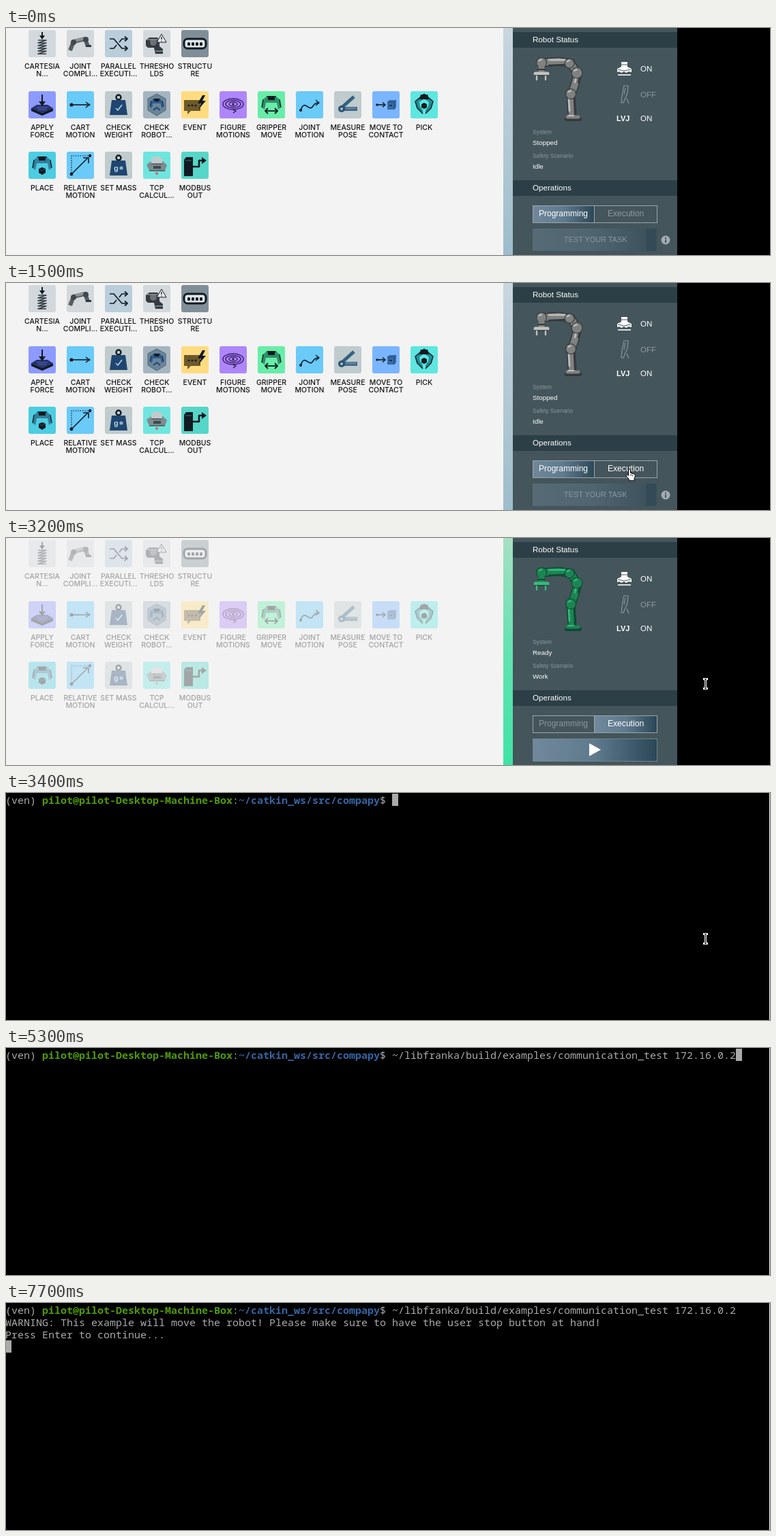
Write an HTML page that moves like this. It is 1120 by 334 pixels and loops after 8 s.

```html
<!DOCTYPE html>
<html lang="en">
<head>
<meta charset="utf-8">
<title>Robot console</title>
<style>
html, body { margin: 0; width: 100%; height: 100%; overflow: hidden; background: #000; }
svg { display: block; width: 1120px; height: 334px; }
text { white-space: pre; }
.label { font: 500 10.5px Inter, sans-serif; text-anchor: middle; fill: #141414; }
.ui { font-family: "Liberation Sans", Arial, sans-serif; }
.term { font: 15px "Noto Sans Mono", monospace; fill: #aaa; }
.term .b { font-weight: 700; }
#desk { --dark: #34393b; --body: #7f8280; --lite: #c0c2be; }
#desk.run { --dark: #0d4a33; --body: #1c8455; --lite: #3db97d; }
#desk.run #tiles { opacity: .36; }
#desk .on, #desk.run .off { display: none; }
#desk.run .on { display: inline; }
.dark { stroke: var(--dark); fill: none; }
.body { stroke: var(--body); fill: none; }
.lite { stroke: var(--lite); fill: none; }
</style>
</head>
<body>
<svg id="stage" viewBox="0 0 1120 334" xmlns="http://www.w3.org/2000/svg"></svg>
<script>
const INK = '#111a22', NAVY = '#1f4670', STEEL = '#34617f';
const rect = (x, y, w, h, fill, more = '') =>
  `<rect x="${x}" y="${y}" width="${w}" height="${h}" fill="${fill}" ${more}/>`;
const fill = (d, c = INK) => `<path d="${d}" fill="${c}"/>`;
const line = (d, c = INK, w = 1.6) =>
  `<path d="${d}" fill="none" stroke="${c}" stroke-width="${w}" stroke-linejoin="round"/>`;
const dot = (x, y, r, c = INK) => `<circle cx="${x}" cy="${y}" r="${r}" fill="${c}"/>`;
const text = (x, y, size, str, color = '#fff', more = '') =>
  `<text class="ui" x="${x}" y="${y}" font-size="${size}" fill="${color}" ${more}>${str}</text>`;
const grad = (id, stops, vertical) =>
  `<linearGradient id="${id}" x2="${vertical ? 0 : 1}" y2="${vertical ? 1 : 0}">` +
  stops.map((c, i) => `<stop offset="${i / (stops.length - 1)}" stop-color="${c}"/>`).join('') +
  '</linearGradient>';

// Icon parts on a 40 x 40 tile
const weight = mark =>
  `<circle cx="20" cy="9" r="3.5" fill="none" stroke="${INK}" stroke-width="2.4"/>` +
  fill('M10 13H30L33 35H7Z', NAVY) + mark;
const claw = (c = STEEL) =>
  fill('M8 12L13 8H27L32 12L34 24L30 27L28 17H12L10 27L6 24Z', c) +
  line('M13 8H27M8 12L6 24M32 12L34 24', INK, 1.4) + fill('M15 7H25V13H15Z');
const diamond =
  fill('M20 4L33 15L30 25L22 33V28L26 22L27 16L20 11L13 16L14 22L18 28V33L10 25L7 15Z', '#1f8f97') +
  line('M20 4L33 15L30 25L22 33M20 4L7 15L10 25L18 33', INK, 1.5) + fill('M15 5H25L27 12H13Z');
const cube = c => fill('M20 17L24 19V24L20 26L16 24V19Z', c);

const art = {
  coil: line('M14 15H26L14 19H26L14 23H26L14 27H26L14 31H26L14 35H26', '#333c42', 1.5) +
    line('M20 3V11', INK, 2) + fill('M16 8H24L20 14Z'),
  arm: line('M5 30L10 17L27 13L31 24', '#565d61', 6) + line('M11 16L27 12', '#8c9498', 4) +
    dot(10, 18, 4, '#41484c') + dot(28, 14, 4, '#41484c') + fill('M28 22H36V25H28Z', '#33393c'),
  shuffle: line('M7 13H13L25 27H32M7 27H13L17 22M21 18L25 13H32', INK, 1.7) +
    line('M29 9.5L33 13L29 16.5M29 23.5L33 27L29 30.5', INK, 1.7),
  limit: fill('M4 15L9 11H21L24 15V24L29 28V35H18L16 26H7L4 23Z', '#343b40') +
    dot(15, 18, 5, '#697277') + line('M18 31H29M6 14H22', '#8a9398', 1.3) +
    `<path d="M27 6L34 18H20Z" fill="#eee" stroke="${INK}"/>` + line('M27 10V14M27 15.5V16.8', INK, 1.3),
  chain: rect(4, 13, 32, 14, '#dfe5e8', `rx="5" stroke="${INK}" stroke-width="3"`) +
    [9, 15, 21, 27].map(x => rect(x, 18, 4, 5, INK, 'rx="1.5"')).join(''),
  press: fill('M4 25L12 20H28L36 25L20 32Z', '#26336e') + fill('M4 25L20 32L36 25V29L20 36L4 29Z', INK) +
    line('M12 24H28M14 27H26', '#5b6ac0', 1) + line('M20 5V17', INK, 2) + fill('M15 15H25L20 22Z'),
  straight: dot(7, 20, 2.6) + line('M7 20H31') + line('M28 16L33 20L28 24') + dot(33, 20, 1.4),
  check: weight(line('M16 25L19 28L25 20', '#b8d3e6', 1.6)),
  robot: fill('M20 4L33 11V28L20 36L7 28V11Z', '#6b8498') + line('M20 4L33 11V28L20 36L7 28V11Z', '#4b6376', 1) +
    `<g transform="translate(6 6) scale(.7)">${claw('#2d5e92')}</g>` + line('M15 28L20 24L25 28', NAVY, 2),
  event: fill('M4 13H28V29H14L9 34V29H4Z', '#6e5a2b') + [11, 16, 21].map(x => dot(x, 21, 1.5)).join('') +
    fill('M31 6L24 18H29L25 27L36 14H31L35 6Z'),
  spiral: [[15, 8], [11, 5.5], [6, 3]].map(([a, b]) =>
    `<ellipse cx="20" cy="19" rx="${a}" ry="${b}" fill="none" stroke="#3c1f6e" stroke-width="1.5"/>`).join('') +
    dot(20, 19, 1.6) + line('M20 27L24 29L20 32', INK, 1.3),
  grip: claw('#2f8f68') + line('M12 29H28', INK, 1.8) + line('M15 25L11 29L15 33M25 25L29 29L25 33', INK, 1.8),
  curve: dot(7, 28, 2) + line('M7 28C13 10 19 32 25 22Q28 17 33 17') + line('M29 13L34 17L29 21'),
  measure: line('M8 27L29 8', STEEL, 5) + rect(7, 23, 27, 6, '#436b8b') +
    dot(11, 26, 5, '#2a5374') + dot(11, 26, 2, '#a9bac3') + line('M17 25H32', '#87a3b4', 1),
  contact: dot(7, 20, 1.8) + line('M7 20H18') + line('M15 16.5L19 20L15 23.5') +
    fill('M22 16L25 13H35V24L32 27H22Z', '#396ba5') + line('M22 16H32V27M32 16L35 13', '#1e477a', 1) +
    line('M25 21H29', INK, 1.4),
  pick: diamond + cube(INK),
  place: claw('#347d9a') + fill('M20 23L25 25V31L20 34L15 31V25Z') + line('M15 25L20 28L25 25', '#49646c', .8),
  relative: line('M7 33L31 9') + line('M24 9H32V17', INK, 1.6) + dot(7, 33, 2.4) + dot(34, 6, 2.2) +
    '<path d="M7 31V6H32" fill="none" stroke="#111a22" stroke-width="1.2" stroke-dasharray="1.6 1.8"/>',
  mass: weight(text(13, 28, 11, 'g', '#b8d3e6', 'font-weight="700"') + dot(24, 24, 2.6, '#8fb0c8')),
  tcp: fill('M5 19L12 14H29L35 20L32 28H9Z', '#7d8c90') + fill('M12 10Q20 4 28 10V18H12Z', '#c4cbcc') +
    line('M9 28H32M12 18H28', '#475459', 1.5) + fill('M15 21H26V25H15Z', '#3d494e') + dot(20, 32, 2, '#c96a6a'),
  output: fill('M4 12L7 8H17V36H4Z') + line('M17 22H26V13H32', INK, 2.6) + fill('M30 8L37 13L30 18Z') +
    line('M6 13H15', '#35756f', 1),
};

const rows = [
  [3, [['#d2d8dc', 'coil', 'CARTESIA|N...'], ['#d2d8dc', 'arm', 'JOINT|COMPLI...'],
    ['#b9cddb', 'shuffle', 'PARALLEL|EXECUTI...'], ['#d2d8dc', 'limit', 'THRESHO|LDS'],
    ['#808e98', 'chain', 'STRUCTU|RE']]],
  [93, [['#8d9aff', 'press', 'APPLY|FORCE'], ['#6acaf8', 'straight', 'CART|MOTION'],
    ['#bfcbcd', 'check', 'CHECK|WEIGHT'], ['#a5b5c0', 'robot', 'CHECK|ROBOT...'],
    ['#ffdc80', 'event', 'EVENT'], ['#ae86fa', 'spiral', 'FIGURE|MOTIONS'],
    ['#68eda8', 'grip', 'GRIPPER|MOVE'], ['#6acaf8', 'curve', 'JOINT|MOTION'],
    ['#bfcbcd', 'measure', 'MEASURE|POSE'], ['#7ab6ff', 'contact', 'MOVE TO|CONTACT'],
    ['#5ee6e1', 'pick', 'PICK']]],
  [182, [['#4ccde2', 'place', 'PLACE'], ['#6acaf8', 'relative', 'RELATIVE|MOTION'],
    ['#bfcbcd', 'mass', 'SET MASS'], ['#6fe5df', 'tcp', 'TCP|CALCUL...'],
    ['#56d6c8', 'output', 'MODBUS|OUT']]],
];
const tile = (x, y, [color, icon, label]) =>
  `<g transform="translate(${x} ${y})">${rect(0, 0, 40, 40, color, 'rx="3"')}${art[icon]}` +
  label.split('|').map((s, i) => `<text class="label" x="20" y="${57 + 11 * i}">${s}</text>`).join('') + '</g>';
const tiles = rows.map(([y, list]) => list.map((t, i) => tile(33 + 56 * i, y, t)).join('')).join('');

const stroke = (cls, d, w) => `<path class="${cls}" d="${d}" stroke-width="${w}" stroke-linecap="round"/>`;
const joint = (x, y, r) =>
  `<circle class="dark" cx="${x}" cy="${y}" r="${r}" style="fill:var(--body)" stroke-width="1.2"/>` +
  stroke('lite', `M${x - r * .5} ${y - r * .4}l${r * .5} ${-r * .2}`, 2);
const limb = 'M830 128L828 100L833 86L838 68L828 52L810 49L787 51';
const arm = stroke('dark', limb, 13) + stroke('body', limb, 10) +
  stroke('lite', 'M826 122L825 104M834 80L836 72M820 47L796 47', 2.5) +
  stroke('dark', 'M834 127L833 104M839 80L841 72M820 54L796 55', 2.4) +
  joint(828, 97, 7.5) + joint(837, 66, 8) + joint(826, 52, 7) + joint(785, 51, 7.5) +
  stroke('body', 'M785 58V63', 9) + stroke('dark', 'M780 61H790', 2) +
  stroke('lite', 'M776 67H794', 5) + stroke('dark', 'M776 70H794', 1.5) + stroke('lite', 'M778 71V76M791 71V76', 2.4) +
  stroke('dark', 'M822 134H841', 6) + stroke('body', 'M823 131H839', 5) + stroke('lite', 'M824 129H832', 2);

const GREY = '#8b989d';
const panel =
  rect(743, 0, 241, 334, '#44555b') + rect(743, 6, 241, 23, '#2c3f46') + rect(743, 224, 241, 23, '#2c3f46') +
  text(772, 21, 11.6, 'Robot Status') + text(772, 239, 11.6, 'Operations') + arm +
  fill('M902 50H911V57L917 60V65L913 64L909 66L906 64L902 66L899 64L896 65V60L902 57Z', '#fff') +
  line('M902 54H911M897 61L906 63L916 61', '#44555b', 1) + line('M897 69H916', '#fff', 1.6) +
  line('M906 85H912L911 96L905 110H902L903 100Z', GREY, 1.2) + line('M908 88L906 98M910 104L913 111', GREY, 1.2) +
  text(895, 137, 11, 'LVJ', '#fff', 'font-weight="700"') +
  text(930, 64, 11.6, 'ON') + text(930, 102, 11.6, 'OFF', GREY) + text(930, 137, 11.6, 'ON') +
  text(772, 156, 8.4, 'System', GREY) + text(772, 191, 8.4, 'Safety Scenario', GREY) +
  `<g class="off">${text(772, 172, 9.8, 'Stopped')}${text(772, 207, 9.8, 'Idle')}` +
  rect(772, 262, 91, 24, 'url(#btn)') + text(781, 277, 12, 'Programming') +
  rect(772, 295, 182, 33, 'url(#btn)', 'opacity=".42"') + rect(938, 295, 15, 33, '#2c4654', 'opacity=".5"') +
  text(818, 315, 10.9, 'TEST YOUR TASK', GREY) +
  dot(967, 312, 6.5, '#a3adb0') + rect(966, 311, 2, 5, '#44555b') + rect(966, 308, 2, 2, '#44555b') + '</g>' +
  `<g class="on">${text(772, 172, 9.8, 'Ready')}${text(772, 207, 9.8, 'Work')}` +
  rect(863, 262, 91, 24, 'url(#btn)') + text(781, 277, 12, 'Programming', GREY) +
  rect(772.5, 295.5, 182, 33, 'url(#btn)', 'stroke="#71848e"') + fill('M855 302L872 311.5L855 321Z', '#fff') + '</g>' +
  text(882, 277, 12.1, 'Execution', '#fff', 'id="exec"') +
  rect(772.5, 261.5, 182, 25, 'none', 'stroke="#9ba7ab"') + line('M862.5 262V286', '#9ba7ab', 1);

const cursors = {
  arrow: '<path d="M1 1V16.5L4.6 13.2L7 19L9.8 17.8L7.4 12.2H12.5Z" fill="#fff" stroke="#000"/>',
  hand: '<path d="M4.5 1.6Q6 .2 7.5 1.6V6.5L13 8Q14.6 8.7 14.4 10.8L13 15V17.8H5.2V15.6L1.2 11' +
    'Q.3 9 2.2 8.8L4.5 10.6Z" fill="#fff" stroke="#000"/>' + line('M8.2 8V11M10.6 9V11.5', '#000', .8),
  beam: line('M0 1.5H7M0 15.5H7M3.5 1V16', '#fff', 3) + line('M2 1.5H5M2 15.5H5M3.5 2V15', '#000', 1),
};

const command = '~/libfranka/build/examples/communication_test 172.16.0.2';
const notice = ['WARNING: This example will move the robot! Please make sure to have the user stop button at hand!',
  'Press Enter to continue...'];
const stage = document.getElementById('stage');
stage.innerHTML =
  `<defs>${grad('btn', ['#71889c', '#5f7a8d', '#2b4656'])}${grad('idle', ['#c9d6dd', '#9dbccb'], 1)}` +
  `${grad('live', ['#a6dfc2', '#63e2b0', '#3fe3a3'], 1)}</defs>` +
  rect(0, 0, 1120, 334, '#000') +
  `<g id="desk">${rect(0, 0, 729, 334, '#f3f3f3')}<g id="tiles">${tiles}</g>` +
  rect(729, 0, 14, 334, 'url(#idle)', 'class="off"') + rect(729, 0, 14, 334, 'url(#live)', 'class="on"') +
  panel + '</g>' +
  `<g id="term" class="term">${rect(1119, 0, 1, 334, '#fff')}<text x="-1" y="16">(ven) ` +
  '<tspan class="b" fill="#4e9a06">pilot@pilot-Desktop-Machine-Box</tspan>:' +
  '<tspan class="b" fill="#3465a4">~/catkin_ws/src/compapy</tspan>$ <tspan id="typed"></tspan></text>' +
  `<g id="notice">${notice.map((s, i) => `<text x="-1" y="${34 + 18 * i}">${s}</text>`).join('')}</g>` +
  rect(0, 0, 9, 18, '#aaa', 'id="caret"') + '</g>' +
  Object.entries(cursors).map(([k, s]) => `<g id="${k}">${s}</g>`).join('');

const el = id => document.getElementById(id);
const show = (node, on) => { node.style.display = on ? '' : 'none'; };
const within = (t, a, b) => t >= a && t < b;
const mix = (a, b, u) => a + (b - a) * u;
const bend = (a, c, b, u) => mix(mix(a, c, u), mix(c, b, u), u);

function pointer(t) {
  if (within(t, 400, 700)) return ['arrow', 659, 230];
  if (within(t, 700, 800)) return ['arrow', 765, 247];
  if (within(t, 800, 2700)) {
    const u = Math.min(1, Math.max(0, (t - 900) / 600));
    return ['hand', bend(866, 774, 908, u), bend(268, 324, 273, u)];
  }
  if (within(t, 2700, 4200)) {
    const u = 1 - (1 - Math.min(1, (t - 2600) / 600)) ** 2;
    const x = mix(908, 1022, u);
    return [x < 984 ? 'arrow' : 'beam', x, mix(273, 206, u)];
  }
  return within(t, 7400, 7700) ? ['beam', 1022, 206] : null;
}

function typedAt(t) {
  if (t < 4500) return '';
  if (t < 5300) return within(t, 4800, 5000) ? 'clear ' : 'clear';
  return command;
}

function draw(ms) {
  const t = Math.floor((ms % 8000) / 100) * 100;
  const shell = t >= 3400;
  show(el('desk'), !shell);
  show(el('term'), shell);
  el('desk').classList.toggle('run', t >= 2000);
  el('exec').setAttribute('fill', t >= 800 ? '#fff' : GREY);

  const typed = typedAt(t);
  if (el('typed').textContent !== typed) el('typed').textContent = typed;
  show(el('notice'), t >= 7000);
  const hidden = within(t, 4000, 4500) || within(t, 6000, 6200) || within(t, 6800, 7400);
  show(el('caret'), !hidden);
  el('caret').setAttribute('x', t < 6500 ? 566 + 9 * typed.length : -1);
  el('caret').setAttribute('y', t < 6500 ? 1 : t < 7000 ? 19 : 55);

  const p = pointer(t);
  for (const k in cursors) show(el(k), p && p[0] === k);
  if (p) el(p[0]).setAttribute('transform', `translate(${Math.round(p[1])} ${Math.round(p[2])})`);
}

const start = performance.now();
function tick(now) {
  draw(Math.max(0, now - start));
  requestAnimationFrame(tick);
}
draw(0);
requestAnimationFrame(tick);
</script>
</body>
</html>
```
